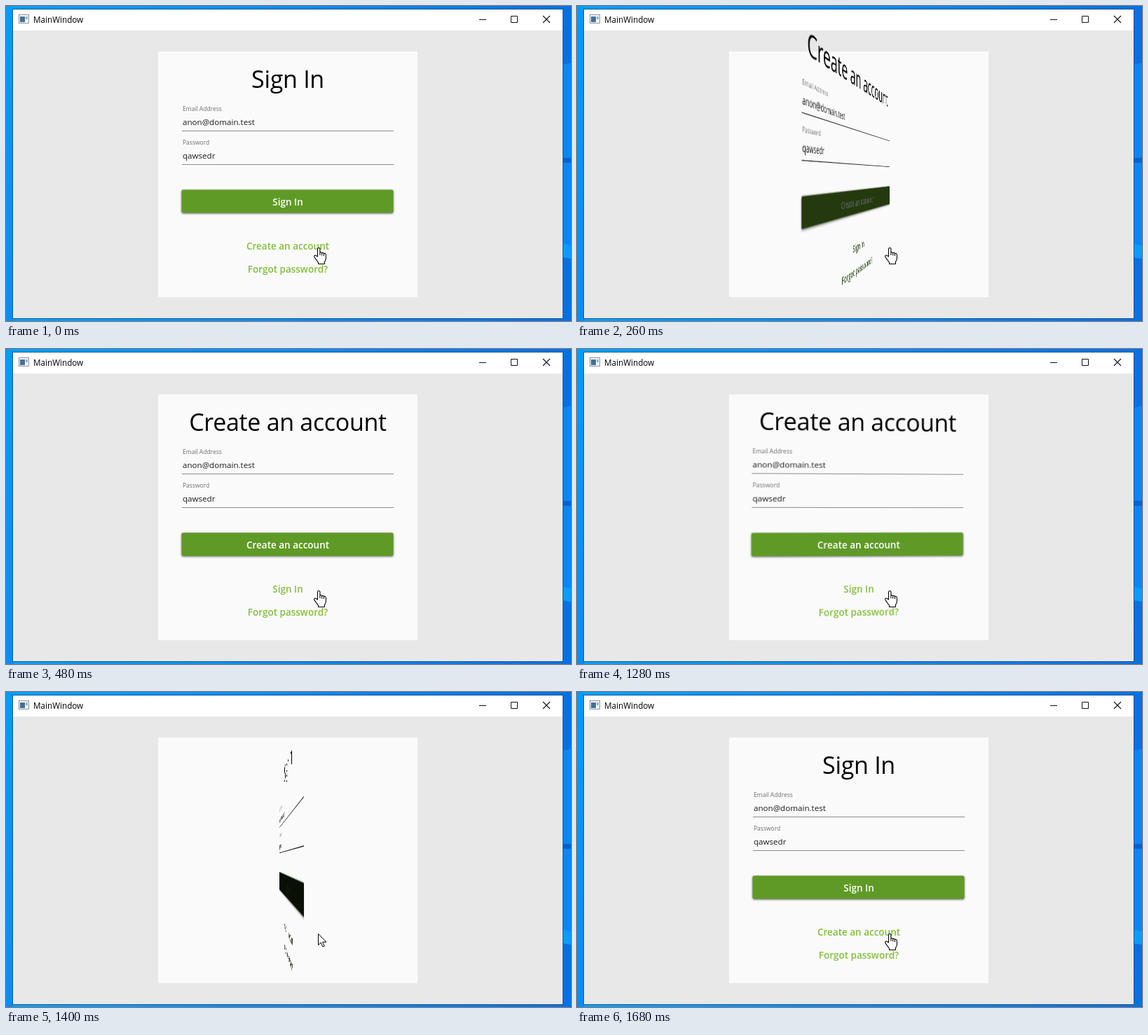
Recreate the animation shown at these times as an HTML page. Size 806 by 450 pixels, loop 1.92 s.

```html
<!DOCTYPE html>
<html lang="en">
<head>
<meta charset="utf-8">
<title>Flip form</title>
<style>
  html, body { margin: 0; width: 100%; height: 100%; overflow: hidden; }
  body { position: relative; background: #0a84f0; }
  svg { position: absolute; left: 0; top: 0; display: block; }
  text { font-family: "Open Sans", "Noto Sans", sans-serif; }
  #client { position: absolute; left: 0; top: 0; width: 806px; height: 450px; clip-path: inset(35px 12px 4px 10px); }
  .face { transform-origin: 402px 240.5px; }
  .title { font-size: 34px; letter-spacing: -.3px; }
  .label { font-size: 8.5px; fill-opacity: .56; }
  .value { font-size: 11.6px; fill: #1c1c1c; }
  .action, .link { font-size: 13.5px; font-weight: 600; }
  .action { fill: #fff; }
  .link { fill: #84bf3e; }
  .button { fill: #5f9a26; filter: drop-shadow(0 1px 1.5px rgba(0, 0, 0, .6)); }
  .mid { text-anchor: middle; }
</style>
</head>
<body>
<svg width="806" height="450" viewBox="0 0 806 450">
  <defs>
    <linearGradient id="sky">
      <stop offset="0" stop-color="#00a2ff"/>
      <stop offset=".5" stop-color="#0a8cf6"/>
      <stop offset="1" stop-color="#0670e2"/>
    </linearGradient>
    <linearGradient id="edge" x2="0" y2="1">
      <stop offset="0" stop-color="#009cfc"/>
      <stop offset="1" stop-color="#0a8df4"/>
    </linearGradient>
  </defs>
  <rect width="806" height="450" fill="url(#sky)"/>
  <rect width="10" height="450" fill="url(#edge)"/>
  <path d="M794 84L806 81V217H794ZM794 224H806V342L794 339Z" fill="#0a86f6"/>
  <path d="M794 217H806V224H794Z" fill="#0562cc"/>
  <path d="M794 339L806 342V361L794 359Z" fill="#0a9cff"/>
  <rect x="9" y="4" width="786" height="443" fill="#14568f"/>
  <rect x="10" y="5" width="784" height="30" fill="#fff"/>
  <rect x="10" y="35" width="784" height="411" fill="#e8e8e8"/>
  <rect x="217" y="65" width="370" height="351" fill="#fafafa"/>
  <rect x="18.5" y="12.5" width="14" height="12" fill="#f4f6f8" stroke="#8b959e"/>
  <rect x="20" y="15" width="7" height="8" fill="#41719a"/>
  <rect x="28" y="15" width="3" height="4" fill="#9fb4c4"/>
  <text x="39" y="24" font-size="11.7">MainWindow</text>
  <g fill="none" stroke="#111">
    <path d="M675 19.5H685M720.5 14.5H729.5V23.5H720.5Z"/>
    <path d="M766 14L776 24M776 14L766 24" stroke-width="1.1"/>
  </g>
</svg>

<div id="client"></div>

<svg width="806" height="450" viewBox="0 0 806 450" fill="#fff" stroke="#000" stroke-linejoin="round">
  <path id="hand" stroke-width="1.1" d="M444.5 358V347.3Q444.5 345.5 446.2 345.5T447.9 347.3V352.2Q449.3 350.9 450.7 352.7Q452.2 351.6 453.4 353.4Q456.4 352.7 456.4 356V360.5Q456.4 363.5 454.4 365.5V368.5H445.6V366.5L440.2 359.2Q438.9 357 440.4 356.2Q441.8 355.6 443 357ZM447.9 352V356M450.7 353V356.5M453.4 353.5V357"/>
  <path id="arrow" d="M445.5 345.5V361.5L449.2 358L451.9 364L454.3 363L451.6 357.2H456.8Z"/>
</svg>

<script>
const LOOP = 1920, STEP = 20, DEPTH = 468;
const client = document.getElementById('client');
const hand = document.getElementById('hand');
const arrow = document.getElementById('arrow');

const field = (label, value, y) => `
  <text class="label" x="252" y="${y - 28}">${label}</text>
  <text class="value" x="252" y="${y - 8}">${value}</text>
  <rect x="251" y="${y}" width="302" height="1" fill="#8c8c8c"/>`;

function addFace(title, other) {
  client.insertAdjacentHTML('beforeend', `
    <svg class="face" width="806" height="450" viewBox="0 0 806 450">
      <text class="title mid" x="402" y="117">${title}</text>
      ${field('Email Address', 'anon@domain.test', 178)}
      ${field('Password', 'qawsedr', 226)}
      <rect class="button" x="250.5" y="262.5" width="302" height="33" rx="2"/>
      <text class="action mid" x="402" y="285">${title}</text>
      <text class="link mid" x="402" y="348">${other}</text>
      <text class="link mid" x="402" y="381">Forgot password?</text>
    </svg>`);
  return client.lastElementChild;
}

const front = addFace('Sign In', 'Create an account');
const back = addFace('Create an account', 'Sign In');

const clamp = a => Math.min(180, Math.max(0, a));

// Flip angle: 0 shows the front, 180 the back.
function angleAt(t) {
  if (t < 120) return 0;
  if (t < 360) return clamp(45.8 + (t - 160) * 0.664);
  if (t < 1280) return 180;
  return clamp(178 - (t - 1280) * 0.783);
}

function pose(face, turn) {
  const light = Math.cos(turn * Math.PI / 180);
  const seen = light > 0;
  face.style.visibility = seen ? 'visible' : 'hidden';
  if (!seen) return;
  face.style.transform = turn ? `perspective(${DEPTH}px) rotateY(${turn}deg)` : 'none';
  face.style.filter = turn ? `brightness(${light})` : 'none';
}

const within = (t, a, b) => t >= a && t < b;

function draw(now) {
  const t = Math.floor((now % LOOP) / STEP) * STEP;
  const angle = angleAt(t);
  pose(front, -angle);
  pose(back, 180 - angle);
  const pointing = !within(t, 160, 240) && !within(t, 1360, 1460);
  hand.style.display = pointing ? '' : 'none';
  arrow.style.display = pointing ? 'none' : '';
}

let start;
function tick(now) {
  start ??= now;
  draw(now - start);
  requestAnimationFrame(tick);
}
draw(0);
requestAnimationFrame(tick);
</script>
</body>
</html>
```
